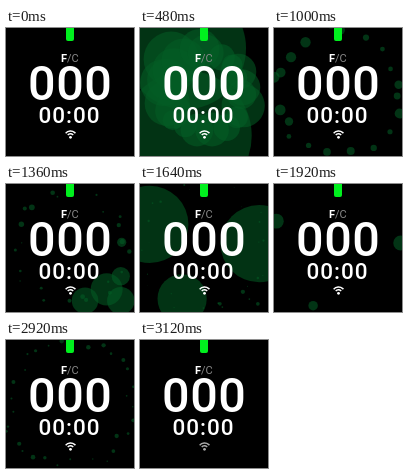
An HTML page with a canvas for the animation above (3.16 s loop, 128 by 128 pixels).

```html
<!DOCTYPE html>
<html lang="en">
<head>
<meta charset="utf-8">
<style>
html, body { margin: 0; width: 100%; height: 100%; overflow: hidden; background: #000; }
canvas { display: block; width: 100vw; height: 100vh; }
</style>
</head>
<body>
<canvas></canvas>
<script>
const LOOP = 3160, STEP = 40, REST = 360, SIZE = 128, MID = 64;
const canvas = document.querySelector('canvas');
const ctx = canvas.getContext('2d');

function seeded(seed) {
  return () => {
    seed = (seed * 1664525 + 1013904223) >>> 0;
    return seed / 4294967296;
  };
}

const lerp = (a, b, k) => a + (b - a) * k;
const easeOut = p => 1 - 2 ** (-10 * p);
const shrink = p => (1 - p) ** 1.5;

// Many small bubbles thrown from the middle to the rim.
function ring({ start, life, count, reach, radius, seed }) {
  const random = seeded(seed);
  const bubbles = Array.from({ length: count }, (_, i) => {
    const angle = (i + random() * 0.9) / count * Math.PI * 2;
    const distance = lerp(reach[0], reach[1], random());
    return {
      dx: Math.cos(angle) * distance,
      dy: Math.sin(angle) * distance,
      r: lerp(radius[0], radius[1], random())
    };
  });
  return { start, life, bubbles };
}

// A few large bubbles, given by resting place and first radius.
function cluster(start, life, places) {
  const bubbles = places.map(([x, y, r]) => ({ dx: x - MID, dy: y - MID, r }));
  return { start, life, bubbles };
}

const bursts = [
  cluster(360, 640, [[40, 8, 88], [42, 120, 94], [108, 38, 26], [22, 22, 40]]),
  ring({ start: 360, life: 980, count: 20, reach: [56, 70], radius: [12, 30], seed: 11 }),
  cluster(1120, 640, [
    [80, 120, 29], [103, 108, 35], [118, 94, 20], [118, 120, 30], [119, 58, 10]
  ]),
  ring({ start: 1120, life: 900, count: 24, reach: [56, 70], radius: [1, 5], seed: 29 }),
  cluster(1480, 600, [[2, 37, 66], [39, 122, 42], [127, 59, 66]]),
  ring({ start: 2160, life: 1000, count: 34, reach: [55, 70], radius: [7, 22], seed: 47 })
];

function drawBurst({ start, life, bubbles }, time) {
  const p = (time - start) / life;
  if (p < 0 || p >= 1) return;
  const travel = easeOut(p);
  ctx.fillStyle = 'rgba(4, 94, 38, 0.55)';
  for (const b of bubbles) {
    ctx.beginPath();
    ctx.arc(MID + b.dx * travel, MID + b.dy * travel, b.r * shrink(p), 0, Math.PI * 2);
    ctx.fill();
  }
}

function label(text, x, y, font, color, spacing = 0) {
  ctx.font = font;
  ctx.letterSpacing = spacing + 'px';
  ctx.fillStyle = color;
  ctx.fillText(text, x, y);
}

function drawWifi(color) {
  ctx.strokeStyle = ctx.fillStyle = color;
  ctx.lineWidth = 1.4;
  for (const r of [3.7, 6.5]) {
    ctx.beginPath();
    ctx.arc(64.5, 109.5, r, -Math.PI * 0.77, -Math.PI * 0.23);
    ctx.stroke();
  }
  ctx.beginPath();
  ctx.arc(64.5, 109.3, 1.4, 0, Math.PI * 2);
  ctx.fill();
}

function drawFace(time) {
  ctx.fillStyle = '#00f01e';
  ctx.beginPath();
  ctx.roundRect(60, -3, 8, 16, 2);
  ctx.fill();

  label('F', 55, 34, '700 11px Roboto, sans-serif', '#fff');
  label('/C', 61, 34, '400 11px Roboto, sans-serif', '#888');
  label('000', 22, 72.3, '500 48.5px Roboto, sans-serif', '#fff', 0.6);
  label('00:00', 32.4, 95, '500 22.5px Roboto, sans-serif', '#fff', 1);
  drawWifi(time >= 3080 ? '#aaa' : '#fff');
}

function frame(now) {
  const scale = devicePixelRatio || 1;
  const width = Math.round(innerWidth * scale);
  const height = Math.round(innerHeight * scale);
  if (canvas.width !== width || canvas.height !== height) {
    canvas.width = width;
    canvas.height = height;
  }
  const time = Math.floor((now % LOOP) / STEP) * STEP;
  ctx.setTransform(width / SIZE, 0, 0, height / SIZE, 0, 0);
  ctx.fillStyle = '#000';
  ctx.fillRect(0, 0, SIZE, SIZE);
  // Bubbles are already in motion when the rest ends.
  if (time >= REST) bursts.forEach(b => drawBurst(b, time + STEP / 2));
  drawFace(time);
  requestAnimationFrame(frame);
}

frame(performance.now());
</script>
</body>
</html>
```
